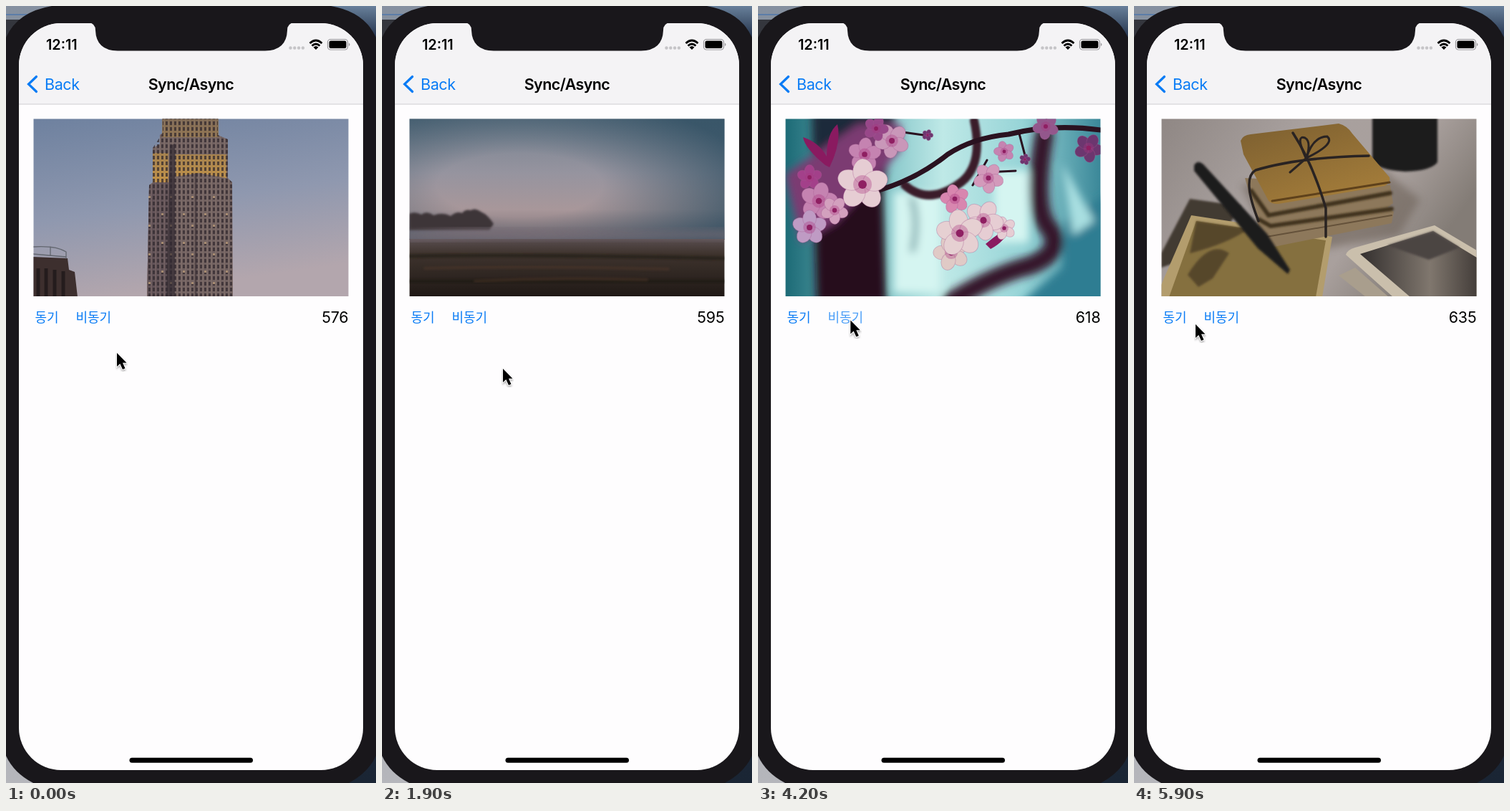
Recreate the animation shown at these times as an HTML page. Size 517 by 1084 pixels, loop 6000 ms.

```html
<!DOCTYPE html>
<html lang="ko">
<head>
<meta charset="utf-8">
<title>Sync/Async</title>
<style>
html, body { margin: 0; width: 100%; height: 100%; overflow: hidden; }
svg { display: block; width: 517px; height: 1084px; }
text { font-family: Inter, Roboto, sans-serif; }
.blue { fill: #087bf5; }
.ko { font: 18px "Noto Sans CJK KR", "Noto Sans CJK", "Noto Sans CJK JP", sans-serif; }
.line { fill: none; stroke-linecap: round; }
</style>
</head>
<body>
<svg viewBox="0 0 517 1084">
<defs>
  <linearGradient id="sky" x2=".25" y2="1"><stop stop-color="#6e819f"/><stop offset=".55" stop-color="#8f98af"/><stop offset="1" stop-color="#b3a6ad"/></linearGradient>
  <linearGradient id="glow" x2="0" y2="1"><stop stop-color="#7d6850"/><stop offset="1" stop-color="#d59d3e"/></linearGradient>
  <linearGradient id="dusk" x2="0" y2="1"><stop stop-color="#75818f"/><stop offset=".45" stop-color="#96949f"/><stop offset=".75" stop-color="#a8979a"/><stop offset="1" stop-color="#7d7076"/></linearGradient>
  <linearGradient id="field" x2="0" y2="1"><stop stop-color="#594e50"/><stop offset=".25" stop-color="#3f342e"/><stop offset="1" stop-color="#1f1815"/></linearGradient>
  <radialGradient id="shade" cx=".35" cy=".55" r=".75"><stop offset=".35" stop-color="#2a4b5f" stop-opacity="0"/><stop offset="1" stop-color="#2a4b5f" stop-opacity=".8"/></radialGradient>
  <linearGradient id="water" x2="0" y2="1"><stop stop-color="#fff"/><stop offset=".12" stop-color="#fbfbfc"/><stop offset=".3" stop-color="#e3eaf0"/><stop offset=".55" stop-color="#d6e0e8"/><stop offset="1" stop-color="#d4dde0"/></linearGradient>
  <linearGradient id="dim" x2="0" y2="1"><stop stop-color="#2c2a05" stop-opacity="0"/><stop offset="1" stop-color="#2c2a05" stop-opacity=".6"/></linearGradient>
  <linearGradient id="teal"><stop stop-color="#1c6a76"/><stop offset=".3" stop-color="#7fc2c6"/><stop offset=".5" stop-color="#bfe9e7"/><stop offset=".75" stop-color="#97d4d7"/><stop offset="1" stop-color="#3a8798"/></linearGradient>
  <linearGradient id="table" x2="1" y2=".4"><stop stop-color="#8f8784"/><stop offset=".4" stop-color="#a8a09e"/><stop offset=".75" stop-color="#a9a09d"/><stop offset="1" stop-color="#837c76"/></linearGradient>
  <linearGradient id="cover" x2=".6" y2="1"><stop stop-color="#7c5f30"/><stop offset="1" stop-color="#a37c3a"/></linearGradient>
  <linearGradient id="print"><stop stop-color="#332f2e"/><stop offset=".6" stop-color="#80776e"/><stop offset="1" stop-color="#443e3a"/></linearGradient>
  <linearGradient id="left" x2="0" y2="1"><stop stop-color="#85909f"/><stop offset="1" stop-color="#b5b6bb"/></linearGradient>
  <linearGradient id="right" x2="0" y2="1"><stop stop-color="#68809a"/><stop offset=".04" stop-color="#25344d"/><stop offset="1" stop-color="#1a2534"/></linearGradient>
  <pattern id="panes" width="6" height="8" patternUnits="userSpaceOnUse"><path d="M1 1h3v5h-3z" fill="#33292f" opacity=".75"/><path d="M5 0v8" stroke="#a18b80" opacity=".45"/></pattern>
  <pattern id="lit" width="30" height="40" patternUnits="userSpaceOnUse"><path d="M7 9h3v3h-3zM19 25h3v3h-3z" fill="#d0b087" opacity=".7"/></pattern>
  <filter id="soft"><feGaussianBlur stdDeviation="6"/></filter>
  <filter id="haze"><feGaussianBlur stdDeviation="1.5"/></filter>
  <filter id="drop"><feDropShadow dx="0" dy="2" stdDeviation="1.5" flood-opacity=".35"/></filter>
  <clipPath id="frame"><path d="M38.500 157.500H478.500V405H38.500z"/></clipPath>
  <clipPath id="screen"><rect x="18" y="24" width="481" height="1042" rx="59"/></clipPath>
</defs>

<!-- desktop and phone -->
<path d="M0 0H258V1084H0z" fill="url(#left)"/>
<path d="M258 0H517V1084H258z" fill="url(#right)"/>
<path d="M0 12H45" stroke="#5c7da8" stroke-width="2"/>
<path d="M0 19H45V45H0z" fill="#34363d"/>
<path d="M0 44Q16 8 64 0H454Q501 8 517 44V1046Q506 1070 479 1084H38Q11 1070 0 1046z" fill="#19171b"/>
<g clip-path="url(#screen)">
  <path d="M18 24H499V1066H18z" fill="#fefdfe"/>
  <path d="M18 24H499V137H18z" fill="#f4f3f5"/>
  <path d="M18 137H499" stroke="#cfced1" stroke-width="1.200"/>
</g>
<path d="M115 23Q125 24 125 34Q126 62 156 62.500H362Q392 62 393 34Q393 24 403 23z" fill="#19171b"/>
<rect x="172.500" y="1048.800" width="172.500" height="7" rx="3.500"/>

<!-- status and navigation bars -->
<text x="56" y="61" font-size="19.800" font-weight="600">12:11</text>
<g fill="#c5c4c7"><circle cx="397.500" cy="58.500" r="2.200"/><circle cx="403.300" cy="58.500" r="2.200"/><circle cx="409.100" cy="58.500" r="2.200"/><circle cx="414.900" cy="58.500" r="2.200"/></g>
<path d="M424.500 52Q433 44 441.500 52M427.500 55.500Q433 50.500 438.500 55.500" fill="none" stroke="#000" stroke-width="2.700"/>
<path d="M429.500 57.500Q433 54.500 436.500 57.500L433 61z"/>
<rect x="449.500" y="46.500" width="28" height="14.500" rx="4" fill="none" stroke="#98979b" stroke-width="1.200"/>
<rect x="451.500" y="48.500" width="24" height="10.500" rx="2.300"/>
<path d="M479 51.500q3 2.200 0 4.600z" fill="#98979b"/>
<path d="M42.500 98.500L31.500 109L42.500 119.500" class="line" stroke="#087bf5" stroke-width="3.200"/>
<text class="blue" x="54" y="117" font-size="21.500" letter-spacing="-.4">Back</text>
<text x="258.500" y="117" font-size="21.500" font-weight="600" letter-spacing="-.6" text-anchor="middle">Sync/Async</text>

<g clip-path="url(#frame)">
  <g class="photo">
    <path d="M38 157H479V406H38z" fill="url(#sky)"/>
    <path d="M197 406L200 250L205 246V198L215 193V180L219 177V157H296V180L310 186V240L316 246L317 406z" fill="#716160"/>
    <path d="M197 406L200 250L235 235V406z" fill="#615257"/>
    <path d="M205 246V205L227 205V246zM237 238V207H308V240L270 233zM218 157H297V183H218z" fill="url(#glow)" opacity=".85"/>
    <path d="M197 406L200 250L205 246V198L219 177V157H296V180L310 186V240L316 246L317 406z" fill="url(#panes)"/>
    <path d="M198 255H316V406H198z" fill="url(#lit)"/>
    <path d="M229 195L236 192V406H224z" fill="#302830" opacity=".65"/>
    <path d="M265 233V406" stroke="#40343a" stroke-width="3" opacity=".6"/>
    <path d="M38 350L86 352L88 368L96 371L100 406H38z" fill="#3d2f2e"/>
    <path d="M38 336Q70 334 84 343V352M38 346L84 350M62 336V348" class="line" stroke="#62666f" stroke-width="1.300"/>
    <path d="M45 366V405M56 366V405M68 368V405M80 370V405" stroke="#241c1d" stroke-width="5"/>
  </g>
  <g class="photo">
    <path d="M38 157H479V326H38z" fill="url(#dusk)"/>
    <path d="M38 157H479V326H38z" fill="url(#shade)"/>
    <path d="M38 325H479V406H38z" fill="url(#field)"/>
    <path d="M38 290Q46 286 55 291Q62 285 72 292Q85 287 96 293Q104 286 112 289Q116 283 124 285Q130 281 138 287Q148 291 156 304L150 313H38z" fill="#3d3539" filter="url(#haze)"/>
    <path d="M30 318Q120 306 250 312T490 312V325Q250 322 30 328z" fill="#786c75" opacity=".75" filter="url(#soft)"/>
    <path d="M38 349Q200 346 479 352M38 384H479" class="line" stroke="#191311" stroke-width="5" opacity=".5" filter="url(#haze)"/>
    <path d="M60 366Q200 362 400 367M130 384Q250 378 370 382" class="line" stroke="#583b2b" stroke-width="4" opacity=".4" filter="url(#haze)"/>
  </g>
  <g class="photo">
    <path d="M38 157H479V406H38z" fill="url(#water)"/>
    <path d="M38 217H300M90 229H478M38 246H250M200 260H478" stroke="#b8cad7" opacity=".35"/>
    <path d="M168 325Q205 292 274 241Q285 231 298 241Q345 275 390 320L345 350L268 320L218 352z" fill="#5a451c"/>
    <path d="M262 255H309L352 300H210z" fill="#3a2810"/>
    <path d="M274 241Q285 231 298 241L309 256Q285 252 262 256z" fill="#71807f"/>
    <path d="M168 326Q205 291 272 246M388 318Q345 279 298 244" class="line" stroke="#c3a26a" stroke-width="2.500"/>
    <path d="M238 285Q262 281 285 289Q308 280 330 281L322 290Q285 298 246 293z" fill="#cdd5dc"/>
    <path d="M210 302H360M185 322L350 324" class="line" stroke="#ddb879" stroke-width="3.500"/>
    <path d="M256 312Q262 303 276 306Q291 303 296 313V321H256z" fill="#705f47"/>
    <path d="M205 406Q213 350 258 322Q268 316 278 322Q325 348 370 346V406z" fill="#58440f"/>
    <path d="M218 352Q240 333 258 322Q268 316 278 322Q306 343 345 349" class="line" stroke="#b3934d" stroke-width="2"/>
    <path d="M268 321V406" stroke="#3c2f0c" stroke-width="6"/>
    <path d="M178 268L218 337" class="line" stroke="#7d8593" stroke-width="4"/>
    <ellipse cx="177" cy="265" rx="8" ry="3.500" fill="#4c596b"/>
    <circle cx="382" cy="317" r="9" fill="#fff5d9" filter="url(#haze)"/>
    <g id="leaves"></g>
    <path d="M38 320H479V406H38z" fill="url(#dim)"/>
  </g>
  <g class="photo">
    <path d="M38 157H479V406H38z" fill="url(#teal)"/>
    <g filter="url(#soft)">
      <path d="M190 260H255V400H190zM330 230H378V330H330z" fill="#d5f5f1"/>
      <path d="M430 300L490 260V420H360L425 365z" fill="#2f7d92"/>
      <path d="M425 220L470 300L440 320z" fill="#a9dfe1"/>
      <path d="M75 145H190L175 260L180 415H82z" fill="#270f1c"/>
      <path d="M75 145H192L182 225H80z" fill="#1a2c3a"/>
      <path d="M270 412Q330 375 380 362Q428 343 408 312Q382 285 400 180" class="line" stroke="#34182a" stroke-width="26"/>
      <path d="M215 270Q225 300 216 340" class="line" stroke="#7fa9ac" stroke-width="8"/>
      <path d="M38 235L140 165H200V200L110 300L60 330z" fill="#7b3a72"/>
    </g>
    <path d="M205 250Q240 280 285 245Q315 220 302 160" class="line" stroke="#3a1c2c" stroke-width="12" filter="url(#haze)"/>
    <path d="M165 258Q220 243 265 207Q300 184 350 179Q410 164 479 173" class="line" stroke="#2a1220" stroke-width="7"/>
    <path d="M365 178L374 212M195 175L238 181M318 232L360 230M300 250L320 215" class="line" stroke="#2a1220" stroke-width="3"/>
    <path d="M94 222Q65 198 63 183Q85 190 96 210Q96 177 111 165Q117 190 100 225zM318 332Q338 315 352 309Q346 328 325 339z" fill="#8a1a60"/>
    <g id="flowers"></g>
  </g>
  <g class="photo">
    <path d="M38 157H479V406H38z" fill="url(#table)"/>
    <path d="M150 250L200 350L370 320L400 270L350 230z" fill="#6d6259" opacity=".6" filter="url(#soft)"/>
    <path d="M333 150H424V218Q415 230 379 231Q341 229 333 216z" fill="#1f1c1c" filter="url(#haze)"/>
    <path d="M78 269L150 279L110 340L38 365V345z" fill="#423b31" filter="url(#haze)"/>
    <path d="M80 292L277 322L263 406H38V389z" fill="#b39d6d"/>
    <path d="M87 300L268 327L254 406H49z" fill="#85703f"/>
    <path d="M87 300L160 311Q130 332 78 345zM75 375Q105 325 133 345L110 380L90 392z" fill="#564729" filter="url(#haze)"/>
    <path d="M155 240L180 330Q190 339 205 334L360 303L363 287L354 281L362 275L358 250z" fill="#8d785b"/>
    <path d="M164 258L188 292L358 261M175 298L191 307L360 283" class="line" stroke="#41321f" stroke-width="6" filter="url(#haze)"/>
    <path d="M185 322L360 292" class="line" stroke="#64513a" stroke-width="2"/>
    <path d="M149 188Q152 180 163 179L286 164Q298 167 305 178L357 239Q359 247 350 251L202 276Q189 277 186 268L153 207z" fill="url(#cover)"/>
    <path d="M193 272L357 246" class="line" stroke="#5e411b" stroke-width="3"/>
    <g class="line" stroke="#292322" stroke-width="3.500">
      <path d="M222 177Q249 218 268 282V322M174 300Q150 240 170 229Q230 211 328 209"/>
      <path d="M240 212Q225 179 239 184Q248 189 241 212Q250 182 270 182Q282 192 241 212L218 232" stroke-width="3"/>
    </g>
    <path d="M84 222Q89 214 97 221L186 318L218 368L215 374L173 338L84 230z" fill="#1f1b1b" filter="url(#haze)"/>
    <path d="M286 376L309 365L356 406H324z" fill="#a99e8d"/>
    <path d="M296 347Q298 340 309 337L420 306L479 341V406H362z" fill="#cabfac"/>
    <path d="M316 346L418 314L479 351V406H386z" fill="url(#print)"/>
    <path d="M354 334L418 314L455 337L412 354z" fill="#4b4542" filter="url(#haze)"/>
  </g>
</g>

<text class="blue ko" x="40.500" y="441">동기</text>
<text class="blue ko" id="async" x="97.500" y="441">비동기</text>
<text id="count" x="478.500" y="442" font-size="21.500" letter-spacing="-.2" text-anchor="end"></text>
<path id="cursor" d="M0 0V19L4.300 15L8 23L11.500 21.500L8 13.700H13.500z" stroke="#fff" stroke-width="1.600" paint-order="stroke" filter="url(#drop)"/>
</svg>
<script>
const $ = id => document.getElementById(id);
const photos = document.querySelectorAll('.photo');
const switches = [0, 1400, 3300, 4200, 5300];
const clicks = [800, 2600, 4000, 4500];
// time, x, y of the pointer tip
const path = [
  [0, 155, 484], [700, 126, 437], [800, 128, 440], [1000, 192, 550], [1900, 169, 506], [2500, 127, 436],
  [2800, 125, 433], [3800, 154, 496], [4000, 130, 440], [4500, 128, 436], [4900, 143, 444], [5900, 86, 444], [6000, 86, 444]
];

let seed = 7;
const rnd = () => (seed = seed * 16807 % 2147483647) / 2147483647;

function bush(from, to, top, count, greens) {
  let out = '';
  for (let i = 0; i < count; i++) {
    const x = from + rnd() * (to - from);
    const y = top(x) + rnd() * (410 - top(x));
    const turn = rnd() * 180;
    const green = greens[rnd() * greens.length | 0];
    out += `<ellipse rx="${3 + rnd() * 3}" ry="${1.5 + rnd() * 2}" fill="${green}" transform="translate(${x} ${y}) rotate(${turn})"/>`;
  }
  return out;
}

function flower(x, y, r, color) {
  let out = '';
  for (let a = 0; a < 360; a += 72)
    out += `<ellipse cy="${-r * .5}" rx="${r * .38}" ry="${r * .47}" fill="${color}" stroke="#a45d91" stroke-opacity=".35" transform="rotate(${a + x})"/>`;
  return `<g transform="translate(${x} ${y})">${out}<circle r="${r * .35}" fill="#a8367f" opacity=".35"/><circle r="${r * .16}" fill="#8f1f62"/></g>`;
}

$('leaves').innerHTML =
  '<path d="M38 268Q130 270 225 346L205 406H38zM340 335L479 295V406H350z" fill="#4f4d0c"/>' +
  bush(38, 222, x => 265 + .0024 * (x - 38) ** 2, 650, ['#5e5a0a', '#857b0d', '#a9991c', '#3b3a06', '#c4b12f', '#6e680c']) +
  bush(342, 479, x => 328 - (x - 340) * .25, 480, ['#4b4d0c', '#6b6711', '#8b811e', '#31330a', '#a8983a', '#57560d']);

const cream = '#e6cdd3', pink = '#c583b1', purple = '#6c366f';
$('flowers').innerHTML = [
  [72, 239, 18, '#a3408a'], [85, 272, 27, pink], [72, 309, 25, '#bf9bc4'], [107, 285, 20, '#d3a0be'],
  [149, 207, 24, pink], [187, 188, 25, '#c997b9'], [165, 171, 18, '#984789'], [146, 249, 37, cream],
  [275, 269, 21, '#d886af'], [322, 240, 22, '#d39abb'], [344, 203, 15, pink], [462, 198, 21, purple],
  [402, 168, 19, '#93578c'], [237, 180, 8, purple], [373, 214, 8, purple], [270, 344, 26, '#e0cac6'],
  [344, 310, 17, cream], [315, 299, 29, cream], [282, 317, 34, '#e6d0d2']
].map(f => flower(...f)).join('');

function draw(now) {
  const t = Math.floor(now % 6000 / 100) * 100;
  const shown = switches.filter(s => s <= t).length - 1;
  photos.forEach((p, i) => p.style.display = i === shown ? '' : 'none');

  $('count').textContent = 576 + t / 100;
  const age = Math.min(...clicks.map(c => t < c ? Infinity : t - c));
  $('async').style.opacity = Math.min(1, .4 + age / 600);

  const i = path.findIndex(p => p[0] > t);
  const [t0, x0, y0] = path[i - 1], [t1, x1, y1] = path[i];
  const k = (t - t0) / (t1 - t0), e = k * k * (3 - 2 * k);
  $('cursor').setAttribute('transform', `translate(${x0 + (x1 - x0) * e} ${y0 + (y1 - y0) * e})`);
  requestAnimationFrame(() => draw(performance.now() - start));
}
const start = performance.now();
draw(0);
</script>
</body>
</html>
```
